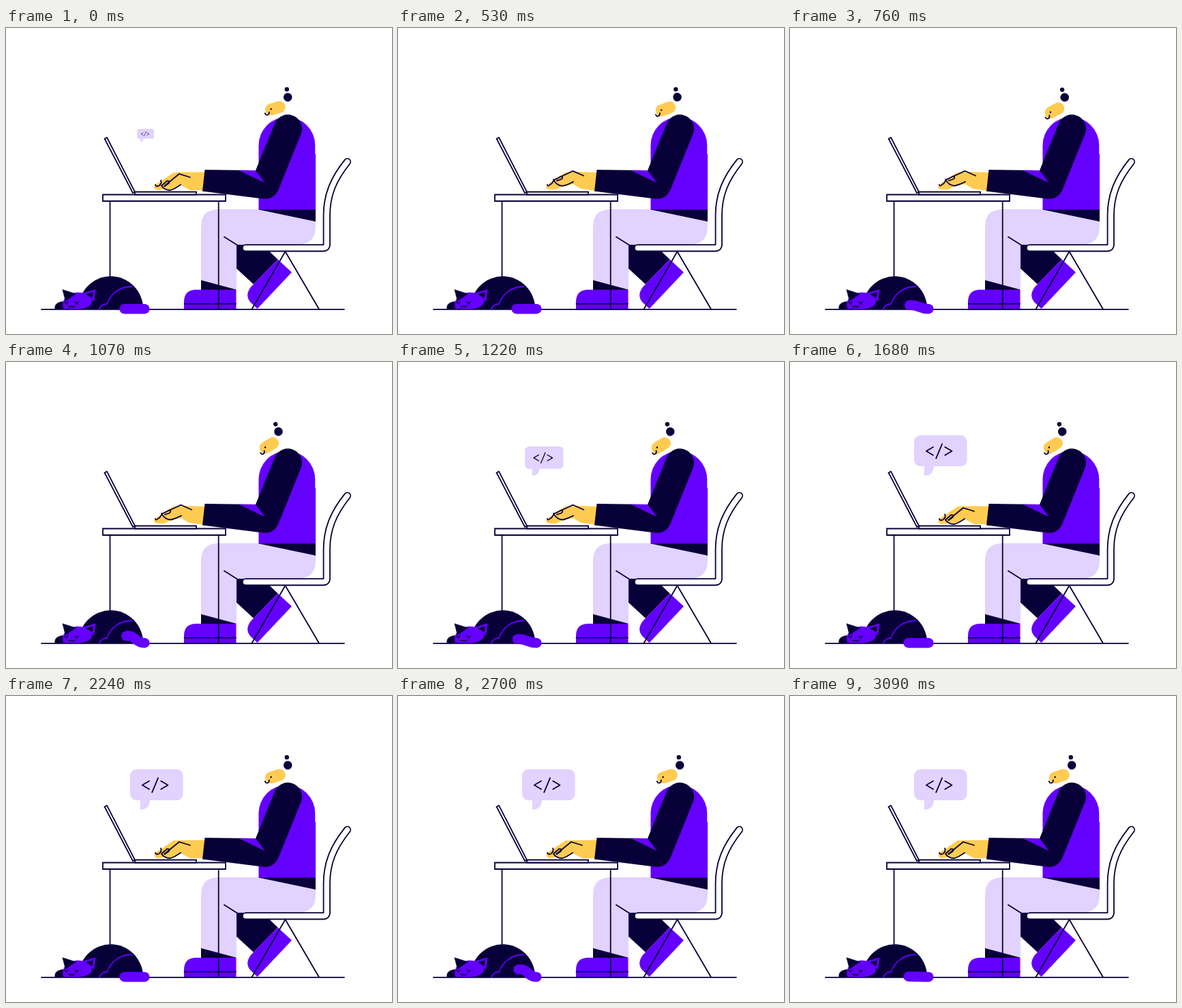
Write an HTML page that moves like this. It is 566 px wide and 449 px high and loops after 3.17 s.

```html
<!DOCTYPE html>
<html lang="en">
<head>
<meta charset="utf-8">
<title>Working late</title>
<style>
html, body { margin: 0; width: 100%; height: 100%; overflow: hidden; background: #fff; }
svg { display: block; width: 100%; height: 100%; }
.n { fill: #080038; }
.p { fill: #6400ff; }
.l { fill: #e1d2ff; }
.y { fill: #ffcb50; }
.w { fill: #fff; }
.s { stroke: #080038; stroke-width: 1.8; }
.o { fill: none; stroke: #080038; stroke-width: 1.8; stroke-linecap: round; stroke-linejoin: round; }
.op { fill: none; stroke: #6400ff; stroke-width: 1.8; stroke-linecap: round; }
.tube { fill: none; stroke-linecap: round; }
</style>
</head>
<body>
<svg viewBox="0 0 566 449">
  <defs>
    <path id="chair" d="M351.5 322.8H465Q470.3 322.8 470.3 317.5V275C470.3 245 480 222 500.5 196.3"/>
  </defs>
  <path class="o" d="M152.5 254V412M52 412.8H496"/>

  <g id="cat">
    <path class="n" d="M106 413A47.6 48.6 0 0 1 201.3 413Z"/>
    <path class="n" d="M71.5 412.5C70.5 404 78 401 86 401L116 400V412.5Z"/>
    <path class="op" d="M137 412C140 406 143 405.5 148 405C153 390 167 379.5 184 379.5"/>
    <path class="p" d="M84 412C80 397 92 388 106 388C121 388 129 399 125 405Q121 411 108 412.5Z"/>
    <path class="n" d="M82.5 383.5L103 390L87 401Z"/>
    <path class="p" d="M131.5 383.5L111 389.5L129 401Z"/>
    <path class="n" d="M128 387.5L117 390.5L126.5 396.5Z"/>
    <path class="o" style="stroke-width:1.5" d="M86 402L89 405L91 401.5M101 401.5L103.500 405L106 402M92 408Q94.5 411 95.5 408Q98 411 100 408"/>
  </g>

  <path class="n" d="M338 318H386V327.5L398.5 339.5L363 376L338 353Z"/>
  <path class="p" d="M398.5 339.5L419 358.5L368.5 412L358 402Q350 392 359 380Z"/>
  <path class="l" d="M312 266H454V291Q454 318 427 318H338V384H286V292Q286 266 312 266Z"/>
  <path class="n" d="M286 370L338 384H286Z"/>
  <path class="p" d="M261 412.5V402Q261 384 279 384H337.5V412.5Z"/>
  <path class="o" d="M261.5 404.7H337M261 412.8H338M320 306.5L339 318.5"/>

  <path class="p" d="M370.5 267V172A41.400 41.400 0 0 1 453.300 172V185H454V267Z"/>
  <path class="n" d="M370.5 266.5H454V284Z"/>

  <path class="o" d="M360.5 412.5L409.5 328L459 412.5"/>
  <g class="tube">
    <use href="#chair" stroke="#080038" stroke-width="11.2"/>
    <use href="#chair" stroke="#fff" stroke-width="7.6"/>
  </g>

  <g id="head">
    <circle class="n" cx="411.8" cy="90" r="3.2"/>
    <circle class="n" cx="413.2" cy="101.6" r="6.3"/>
    <path class="tube" stroke="#ffcb50" stroke-width="17.5" d="M388.8 119.6L401 115.9"/>
    <circle class="n" cx="388.6" cy="119" r="1.3"/>
    <path class="o" d="M379.8 125C381 129 386 128.5 386 123.3"/>
  </g>

  <path class="o" d="M311.7 254V412"/>
  <path class="w s" d="M142 244.5H322V254H142Z"/>
  <path class="w s" d="M189 240.5H279V244.5H189Z"/>
  <path class="w s" d="M144.5 162.5L148 160.7L189 240.5L186 242Z"/>

  <path class="y" id="hand"/>
  <path class="o" id="lines"/>
  <path class="n" d="M291.5 208L366 209L394.6 138.8A20.8 20.8 0 0 1 433 154.600L400 236Q394 251.500 378 250.800L288 239.5Z"/>
  <path class="p" d="M341 208.7L366 209L379.5 227Z"/>

  <g id="bubble">
    <rect class="l" x="182" y="107.5" width="77.5" height="45.5" rx="9"/>
    <path class="l" d="M197 150V167Q211 166 211 152Z"/>
    <path class="o" d="M210 124.8L199.8 130.8L210 136.8M223 120.3L214.2 141.3M227.2 124.800L237.500 130.800L227.200 136.800"/>
  </g>

  <path class="tube" id="tail" stroke="#6400ff" stroke-width="14.6"/>
</svg>
<script>
const LOOP = 3170;
const [head, hand, lines, bubble, tail] = ['head', 'hand', 'lines', 'bubble', 'tail']
  .map(id => document.getElementById(id));

const up = {
  hand: 'M292 211.5L262 211.5L246 212L231 222L219 230Q214 236 223 238L234 236L243 237L256 230.5L270 238L290 238Z',
  lines: 'M232 232L254 214L270 219M228 231.5L236 224.5Q241 224 239 227.5L233 232M228 231.5Q232 238 241 238Q248 236 256 230M219 230Q220 234 225 231Q229 228 227 223.5'
};
const down = {
  hand: 'M292 212L263 211L245 212L231 221L219 229.5Q214 235 222 237L232 237L242 232L257 229L267 235.5L290 239Z',
  lines: 'M229 222.500L256.5 209.700L272.2 216.7M232 221.5L239 217.5Q243 218 240 221.5L233 224M228 222Q232 231 242 231.5Q249 230 257 225.5M218.8 230Q220 233 222 230.5Q227 228 228.5 222.5'
};

const ramp = (t, from, len) => Math.min(1, Math.max(0, (t - from) / len));
const easeOut = x => 1 - (1 - x) ** 3;
const smooth = x => x * x * (3 - 2 * x);
const back = x => 1 + 1.9 * (x - 1) ** 3 + 0.9 * (x - 1) ** 2;
const sway = (t, start) => Math.sin(Math.PI * ramp(t, start, 920)) ** 2;
const shrink = t => (1 - ramp(t, 3092, 250)) ** 3;

// Blend two paths that share the same commands.
function mix(a, b, k) {
  const to = b.match(/[\d.]+/g);
  let i = 0;
  return a.replace(/[\d.]+/g, v => (+v + (to[i++] - v) * k).toFixed(2));
}

function bubbleSize(t) {
  if (t < 1100) return shrink(t + LOOP);
  return back(ramp(t, 1100, 460)) * shrink(t);
}

function draw(t) {
  const nod = easeOut(ramp(t, 450, 850)) - easeOut(ramp(t, 1685, 560));
  head.setAttribute('transform', `rotate(${-15 * nod} 408.5 155)`);

  const press = smooth(ramp(t, 450, 90)) - smooth(ramp(t, 1540, 100));
  hand.setAttribute('d', mix(up.hand, down.hand, press));
  lines.setAttribute('d', mix(up.lines, down.lines, press));

  const s = bubbleSize(t);
  bubble.setAttribute('transform', `translate(197 167) scale(${s}) translate(-197 -167)`);
  bubble.style.display = s < 0.005 ? 'none' : '';

  const k = sway(t, 530) + sway(t, 2240);
  const x = 173.6 + 3 * k, y = 412.2 - 11 * k;
  tail.setAttribute('d', `M${x} ${y}C${x + 14} ${y - 2 * k} 189 412.2 203.3 412.2`);
}

function tick(now) {
  draw(now % LOOP);
  requestAnimationFrame(tick);
}
draw(0);
requestAnimationFrame(tick);
</script>
</body>
</html>
```
